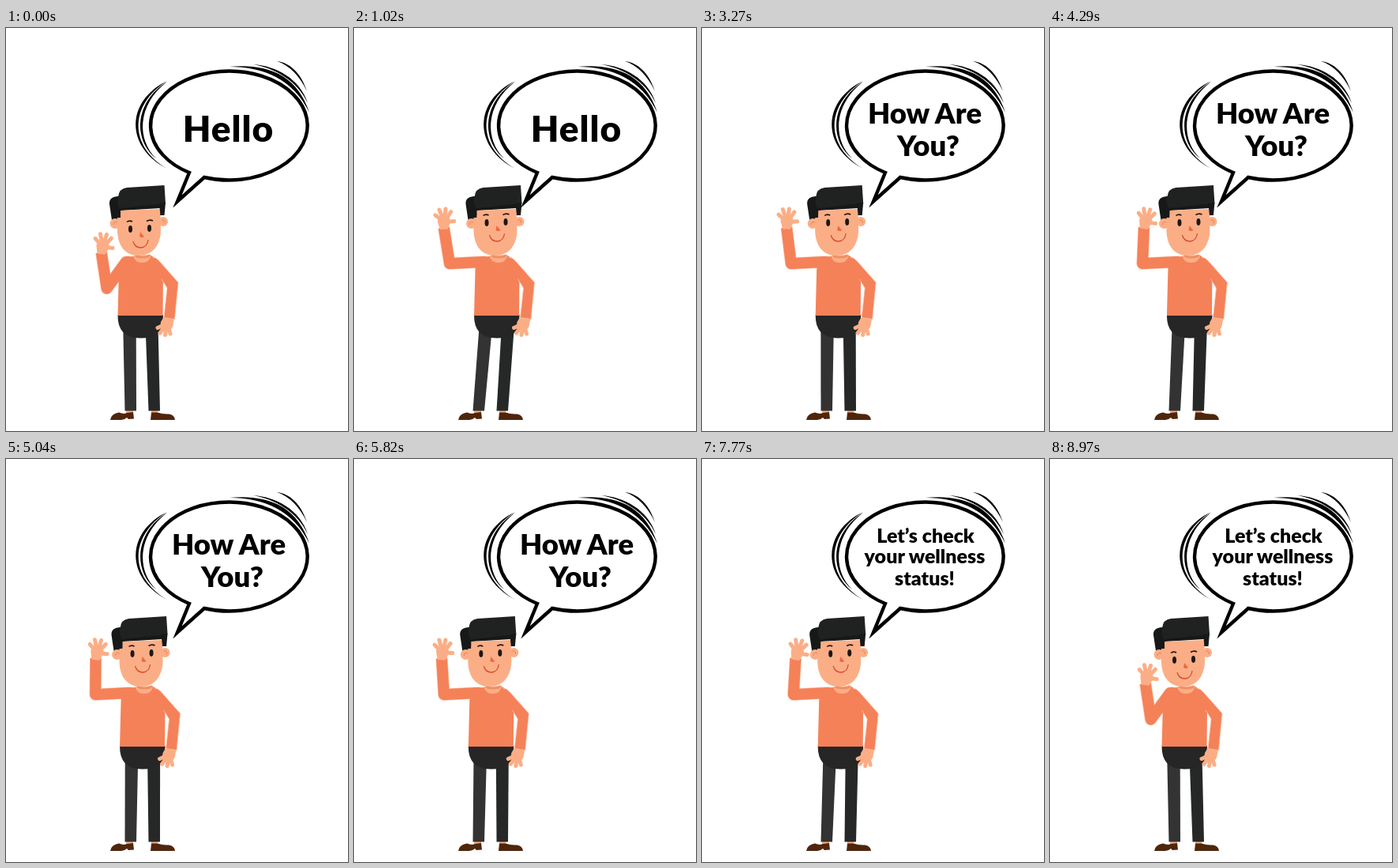
Animation of 433 by 510 pixels, one loop 9 s. Source, as an HTML page:

```html
<!DOCTYPE html>
<html lang="en">
<head>
<meta charset="utf-8">
<title>Hello</title>
<style>
html, body { margin: 0; width: 100%; height: 100%; overflow: hidden; background: #fff; }
svg { display: block; }
text { font-family: Lato, "Open Sans", sans-serif; font-weight: 900; text-anchor: middle; }
.skin { fill: #fbae86; }
.finger { stroke: #fbae86; stroke-width: 5; stroke-linecap: round; fill: none; }
.shirt { fill: #f58158; }
.sleeve { fill: none; stroke-linejoin: round; }
</style>
</head>
<body>
<svg width="433" height="510" viewBox="0 0 433 510">
  <!-- speech bubble -->
  <path d="M251 189L217 219.500L232 183A99.300 69 0 1 1 251 189Z" fill="#fff" stroke="#000" stroke-width="4.400" stroke-miterlimit="8"/>
  <path d="M204 67C152 92 150 150 204 178C156 150 155 98 204 67Z
    M204 68C162 94 161 142 190 165C166 142 165 98 204 68Z
    M283 49C328 45 368 57 384 107C364 65 326 49 283 49Z
    M313 46C342 48 372 64 382 95C369 67 341 51 313 46Z
    M343 42C360 44 374 58 381 80C372 61 359 47 343 42Z"/>
  <g class="line" font-size="46" letter-spacing="1"><text x="281.500" y="144">Hello</text></g>
  <g class="line" font-size="36.500"><text x="282" y="121">How Are</text><text x="286.500" y="161.500">You?</text></g>
  <g class="line" font-size="25"><text x="283" y="106">Let’s check</text><text x="282" y="132">your wellness</text><text x="282" y="160">status!</text></g>

  <!-- feet and legs -->
  <path class="skin" d="M152 483h9v5h-9ZM184 483h8v5h-8Z"/>
  <path d="M132 496Q133 488 143 486.500Q149 489 153 487L161 486L162 494.500L155 495L153 493Q150 496 146 496ZM183 496L184 486.500L192 486.500Q198 489 206 488.500Q213 489 214 496Z" fill="#4f260c"/>
  <path id="leftLeg" fill="#333"/>
  <path id="rightLeg" fill="#262827"/>

  <g id="body">
    <path d="M141.500 363H199L198.500 373Q196 392.500 170 392.500Q141 392.500 141.500 363Z" fill="#262626"/>
    <!-- raised arm -->
    <path class="sleeve arm" stroke="#fbc3aa" stroke-width="15.200"/>
    <path class="sleeve arm" stroke="#f58158" stroke-width="13.800"/>
    <!-- torso and resting arm -->
    <path class="shirt" d="M161 289L152 289.500Q143 293 143 306L141.500 364H198.500L199 310L190 292L184 288Z"/>
    <g id="rest"></g>
    <path class="shirt" d="M186 290Q191 291 195 296L218 322L213.500 368.500L200 366.500L204 329L196 316Z" stroke="#fbc3aa" stroke-width=".8"/>
    <path class="shirt" d="M182 290L190 292L199 304L198 318L182 312Z"/>
    <path class="skin" d="M161 288Q163 297 172 297Q182 297 184 287Z"/>
    <path d="M163 286Q173 292 182 286L182 290Q172 293 164 290Z" fill="#ef8f66"/>
    <!-- head -->
    <path d="M131 223Q130 214 141 213L198 207L200 237H195V228L146 231L145 241L134 243Z" fill="#171818"/>
    <g class="skin">
      <circle cx="138" cy="247.500" r="6.500"/><circle cx="199" cy="245" r="6"/>
      <path d="M145 231L195.500 229L196 257C195 276 185 288 168 288C151 288 142 276 141 258V240H145Z"/>
    </g>
    <path d="M136 249Q136 244 141 246M197 243Q202 242 201 247" fill="none" stroke="#ee8058"/>
    <path d="M142 214Q143 203 153 202L200.500 199L202 222L144 228Q140 221 142 214Z" fill="#202222"/>
    <path d="M194 222L202 221L200.500 237H195.500Z" fill="#171818"/>
    <g id="face">
      <g fill="#1d1715"><ellipse cx="157.500" cy="254.500" rx="2.500" ry="4.400"/><ellipse cx="181.500" cy="253.500" rx="2.500" ry="4.400"/></g>
      <path d="M153 245.500Q156 243 160 245M178 244.500Q182 242 186 244" fill="none" stroke="#1d1715" stroke-width="1.600"/>
      <path d="M170 258L175 264Q172 266 169 264Z" fill="#ef6845"/>
      <path d="M161 270Q163 278 171 278Q179 277 180 268" fill="none" stroke="#d94c2e" stroke-width="1.300"/>
    </g>
    <g id="hand"></g>
  </g>
</svg>
<script>
const $ = id => document.getElementById(id);
const lines = [...document.querySelectorAll('.line')];
const arms = document.querySelectorAll('.arm');
const TAU = Math.PI * 2, rad = Math.PI / 180;
const mix = (a, b, k) => a + (b - a) * k;
const smooth = x => { x = Math.min(1, Math.max(0, x)); return x * x * (3 - 2 * x); };
const fingers = (x, y, tips) => tips.map(([u, v]) => `<path class="finger" d="M${x} ${y}L${u} ${v}"/>`).join('');

$('hand').innerHTML = '<path class="skin" d="M-5 2L-7.500 -8Q-8 -15 0 -16Q8 -16 9 -8L5 2Z"/>' +
  fingers(1, -7, [[-10, -16.500], [-4.500, -23], [3.500, -23.500], [10, -19.500], [13.500, -7.500]]);
$('rest').innerHTML = '<path class="skin" d="M200 365L213 367L211 378Q208 385 200 383Q194 379 196 372Z"/>' +
  fingers(204, 374, [[192, 379.500], [195, 386], [201.500, 388.500], [208, 387]]);

function draw(ms) {
  const t = Math.floor(ms % 9000 / 30) * .03;

  // hips shift sideways over planted feet; the first sway is wider
  const s = (t < 1.8 ? 5.5 : 3.7) * (1 - Math.cos(TAU * t / 1.8));
  $('body').setAttribute('transform', `translate(${s})`);
  $('leftLeg').setAttribute('d', `M${148.2 + s} 376h16.500L165 484.500h-14.500Z`);
  $('rightLeg').setAttribute('d', `M${176.5 + s} 376h16L195 484.500h-14.500Z`);

  // the arm and the gaze lift, the hand waves, and both come down again
  const lift = smooth(Math.min(t, 8.97 - t) / .9);
  const wave = -93 + 6.5 * Math.cos(TAU * 1.42 * t);
  const upper = mix(126, 177, lift) * rad, fore = mix(-98.6, wave, lift) * rad;
  const ex = 152 + 41.5 * Math.cos(upper), ey = 296 + 41.5 * Math.sin(upper);
  const wx = ex + 46 * Math.cos(fore), wy = ey + 46 * Math.sin(fore);
  arms.forEach(a => a.setAttribute('d', `M157 296L152 296L${ex} ${ey}L${wx} ${wy}`));
  $('hand').setAttribute('transform', `translate(${wx} ${wy}) rotate(${mix(8, (wave + 96.5) * 1.2, lift)})`);
  $('face').setAttribute('transform', `translate(0 ${-8 * lift})`);

  lines.forEach((l, i) => l.style.display = i === Math.floor(t / 3 + 1e-6) ? '' : 'none');
}

const start = performance.now();
(function tick() {
  draw(performance.now() - start);
  requestAnimationFrame(tick);
})();
</script>
</body>
</html>
```
